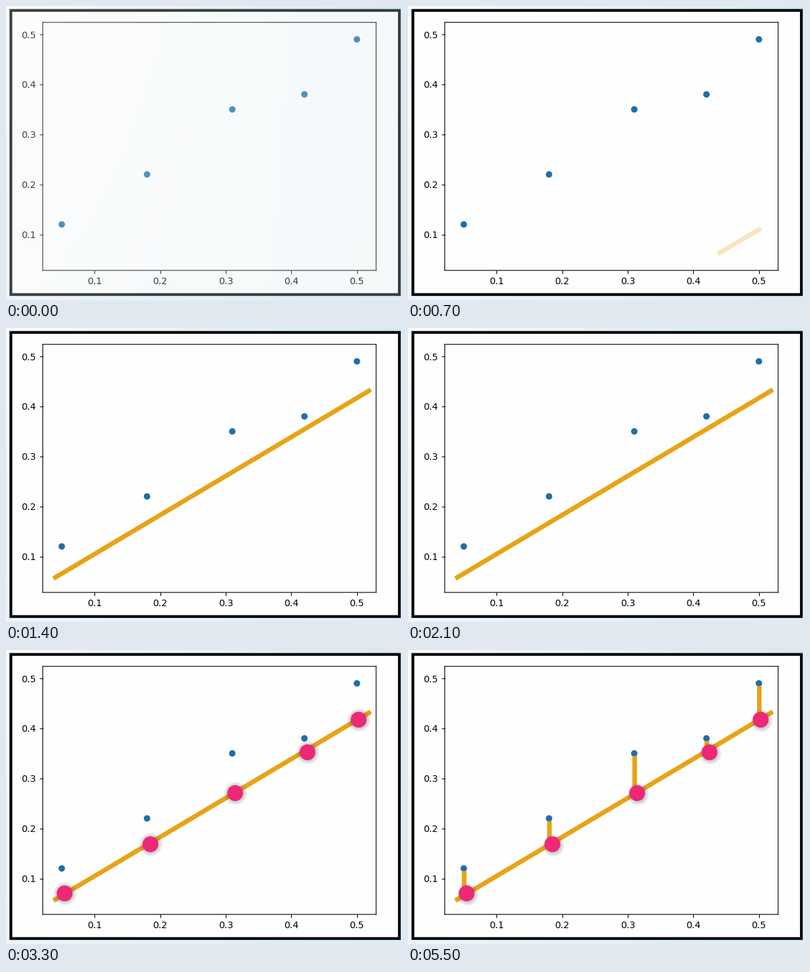
Animation, 600 px wide and 446 px high, one loop 5600 ms. Source, as a matplotlib script:

```python
import numpy as np
import matplotlib.pyplot as plt
from matplotlib.animation import FuncAnimation
from matplotlib.patches import Rectangle

W, H, DPI = 600, 446, 100
FRAMES, STEP_MS = 56, 100
PT = 72 / DPI  # points per pixel

BLUE, GOLD, PINK = "#206ea9", "#e8a317", "#ec2877"
plt.rcParams["font.family"] = "DejaVu Sans"

# Scatter data and the plot box in stage pixels
XS = np.array([0.05, 0.18, 0.31, 0.42, 0.50])
YS = np.array([0.12, 0.22, 0.35, 0.38, 0.49])
LEFT, RIGHT, TOP, BOTTOM = 55.7, 560.8, 24.8, 401.1
X0, X_UNIT = 34.8, 993.75
Y0, Y_UNIT = 422.4, 758.75
PX, PY = X0 + X_UNIT * XS, Y0 - Y_UNIT * YS

# Fitted line, the spot it grows from, and the points on it
LINE = np.array([[71.8, 380.1], [552.8, 93.6]])
SEED = np.array([532, 375.6])
DOTS = np.array([[88.8, 369.2], [218.8, 294.7], [347.2, 217.1], [456.8, 155.2], [534.3, 105.7]])
DOT_R = 12
SHADOW_R = np.linspace(10, 18, 12)

LINE_AT, DOTS_AT, BARS_AT = 7, 30, 40


def backdrop():
    """Pale gradient, white at top left and blue at top right."""
    tl, tr, bl, br = np.array([[250, 252, 251], [214, 234, 242],
                               [236, 245, 250], [220, 236, 242]]) / 255
    u = np.linspace(0, 1, W)[None, :, None]
    v = np.linspace(0, 1, H)[:, None, None]
    return (1 - v) * ((1 - u) * tl + u * tr) + v * ((1 - u) * bl + u * br)


def grow(k, start):
    """Quick ease-out from small to full size; 0 before the start."""
    if k < start:
        return 0.0
    u = min((k - start + 0.1) / 2.1, 1)
    return 1 - (1 - u) ** 3


def areas(r):
    """Scatter sizes of circles with radius r in pixels; one each avoids snapping."""
    return np.full(len(XS), (2 * r * PT) ** 2)


def stage_axes(zorder):
    ax = fig.add_axes([0, 0, 1, 1], zorder=zorder)
    ax.set_axis_off()
    ax.set_xlim(0, W)
    ax.set_ylim(H, 0)
    ax.set_autoscale_on(False)
    return ax


def fill(ax, **kw):
    return ax.imshow(backdrop(), extent=(0, W, H, 0), aspect="auto", **kw)


def discs(x, y, r, color, zorder):
    return top.scatter(x, y, s=areas(r), color=color, lw=0, zorder=zorder)


def stroke(zorder):
    return top.plot([], [], color=GOLD, lw=7 * PT, solid_capstyle="butt",
                    snap=False, zorder=zorder)[0]


fig = plt.figure(figsize=(W / DPI, H / DPI), dpi=DPI)

back = stage_axes(0)
fill(back, zorder=0)
back.add_patch(Rectangle((7.4, 6.7), 588.6, 431, facecolor="#fefefe", edgecolor="black",
                         lw=4.2 * PT, snap=False, zorder=1))

plot = fig.add_axes([LEFT / W, 1 - BOTTOM / H, (RIGHT - LEFT) / W, (BOTTOM - TOP) / H],
                    facecolor="none", zorder=1)
plot.set_xlim((LEFT - X0) / X_UNIT, (RIGHT - X0) / X_UNIT)
plot.set_ylim((Y0 - BOTTOM) / Y_UNIT, (Y0 - TOP) / Y_UNIT)
ticks = np.arange(1, 6) / 10
plot.set_xticks(ticks)
plot.set_yticks(ticks)
plot.tick_params(labelsize=10.18, length=3.56, width=0.82, pad=3.8)
for spine in plot.spines.values():
    spine.set_linewidth(0.82)
    spine.set_snap(False)

top = stage_axes(2)
discs(PX, PY, 4.9, BLUE, 1)
line = stroke(2)
bars = [stroke(3) for _ in XS]
shadows = [discs(*DOTS.T, r, "#303038", 4) for r in SHADOW_R]
dots = discs(*DOTS.T, DOT_R, PINK, 5)
veil = fill(top, zorder=9)


def draw(k):
    veil.set_alpha(0.26 * max(1 - k / 6, 0) ** 3)

    p = grow(k, LINE_AT)
    line.set_data(*(SEED + p * (LINE - SEED)).T)
    line.set_alpha(p ** 0.65)

    # The shadow glow drifts towards the lower right once the dots are in
    p = grow(k, DOTS_AT)
    settle = np.clip((k - 33) / 2, 0, 1)
    dots.set_sizes(areas(DOT_R * p))
    dots.set_alpha(p ** 0.65)
    for r, shadow in zip(SHADOW_R, shadows):
        shadow.set_sizes(areas((r - settle) * p))
        shadow.set_offsets(DOTS + [0.5 + settle, 0.5 + 1.5 * settle])
        shadow.set_alpha(0.026 * p)

    p = grow(k, BARS_AT)
    for bar, x, y, dot_y in zip(bars, PX, PY, DOTS[:, 1]):
        ends = np.array([y + 4, dot_y])
        mid = ends.mean()
        bar.set_data([x + 0.6] * 2, mid + p * (ends - mid))
        bar.set_alpha(p ** 0.65)
    return []


anim = FuncAnimation(fig, draw, frames=FRAMES, interval=STEP_MS,
                     init_func=lambda: draw(0), repeat=True, repeat_delay=0)
plt.show()
```
